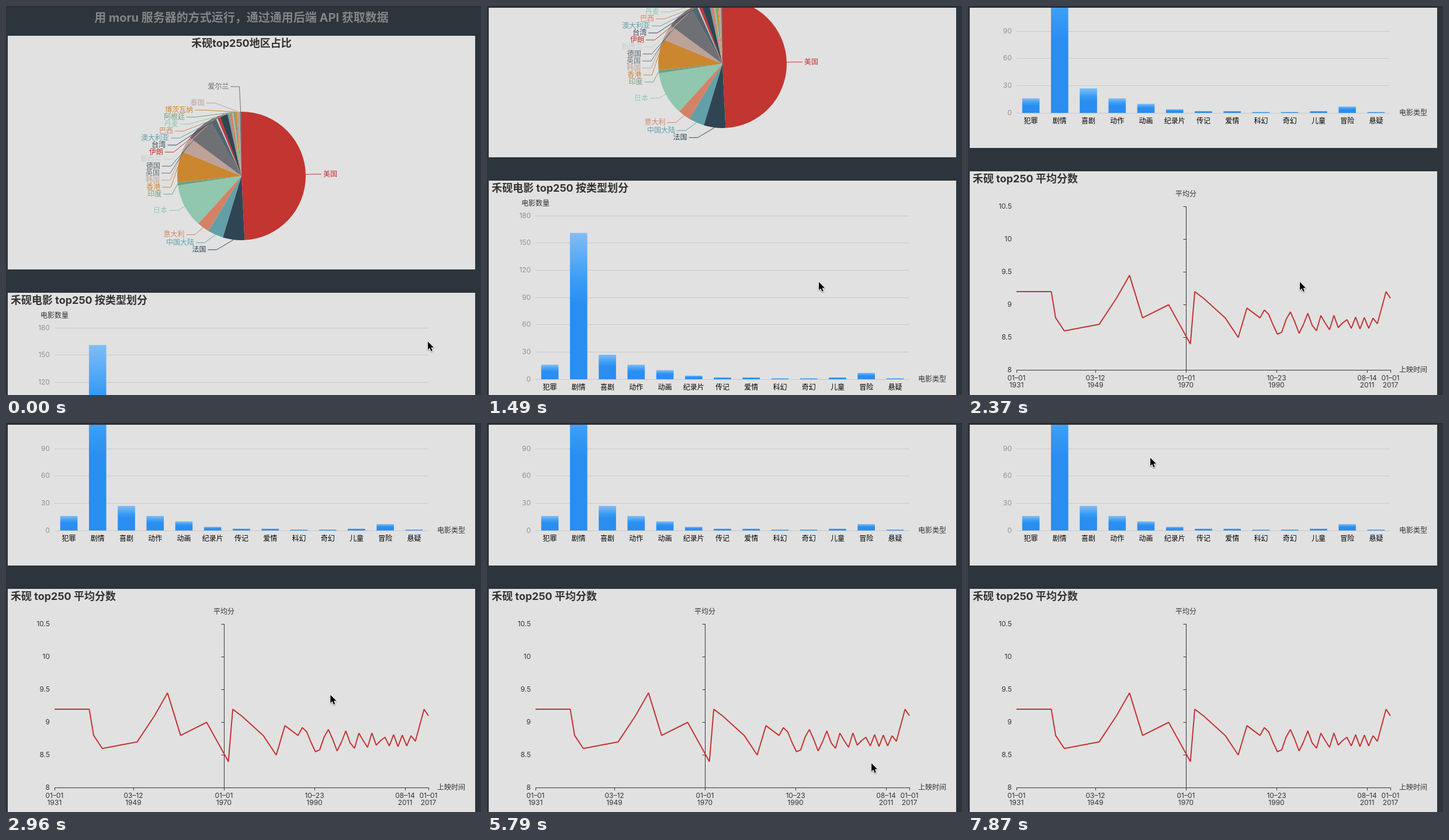
Animation of 813 by 666 pixels, one loop 8000 ms. Source, as an HTML page with a canvas:

```html
<!DOCTYPE html>
<html lang="zh-CN">
<head>
<meta charset="utf-8">
<title>Charts</title>
<style>
html, body { margin: 0; width: 100%; height: 100%; overflow: hidden; background: #2c343c; }
canvas { display: block; }
</style>
</head>
<body>
<canvas id="stage" width="813" height="666"></canvas>
<script>
const ctx = document.getElementById('stage').getContext('2d');
const FONT = 'Inter, "Noto Sans CJK SC", "Noto Sans CJK", sans-serif';
const TITLE = 'bold 18px';
const LOOP = 8000, STEP = 148.4, LAST_STEP = 53;
const LEFT = 83, WIDTH = 640, RIGHT = LEFT + WIDTH;
const PALETTE = ['#c23531', '#2f4554', '#61a0a8', '#d48265', '#91c7ae', '#749f83',
  '#ca8730', '#bda29a', '#6e7074', '#546570', '#c4ccd3'];

const regions = Object.entries({
  美国: 126, 法国: 14, 中国大陆: 10, 意大利: 8, 日本: 28, 印度: 2, 香港: 20, 韩国: 10,
  英国: 17, 德国: 4, 新西兰: 1, 伊朗: 2, 台湾: 5, 澳大利亚: 1, 巴西: 2, 丹麦: 1,
  阿根廷: 1, 博茨瓦纳: 1, 泰国: 2, 爱尔兰: 1
});
const genres = Object.entries({
  犯罪: 16, 剧情: 161, 喜剧: 27, 动作: 16, 动画: 10, 纪录片: 4, 传记: 2,
  爱情: 2, 科幻: 1, 奇幻: 1, 儿童: 2, 冒险: 7, 悬疑: 1
});
const dates = ['01–01 1931', '03–12 1949', '01–01 1970', '10–23 1990', '08–14 2011', '01–01 2017'];

// [years since 1931, score]; the busy later years follow a fading chirp
const recent = Array.from({ length: 26 }, (_, u) =>
  [57 + u, 8.72 + (.2 - .005 * u) * Math.cos(2 * Math.PI * u * (.12 + .008 * u))]);
const scores = [[0, 9.2], [8, 9.2], [9, 8.8], [11, 8.6], [19, 8.7], [23, 9.1], [26, 9.45],
  [29, 8.8], [35, 9], [40, 8.4], [41, 9.2], [43, 9.1], [48, 8.8], [51, 8.5], [53, 8.95],
  [56, 8.8], ...recent, [83, 8.71], [85, 9.2], [86, 9.1]];

// motion keys: [step, values...]
const scrollKeys = [[6.77, 0], [12, 311], [16, 648], [18, 648], [19, 647]];
const cursorBefore = [[0, 721, 573], [2, 731, 588], [3, 731, 588], [7, 567, 471],
  [18, 567, 471], [24, 529, 450]];
const cursorAfter = [[39, 657, 581], [46, 298, 450], [49, 277, 400], [53, 311, 58]];

function sample(keys, step) {
  const next = keys.findIndex(k => k[0] > step);
  if (next === 0) return keys[0].slice(1);
  if (next < 0) return keys[keys.length - 1].slice(1);
  const a = keys[next - 1], b = keys[next];
  const u = (step - a[0]) / (b[0] - a[0]);
  return a.slice(1).map((v, i) => v + (b[i + 1] - v) * u);
}

function text(str, x, y, align = 'left', color = '#333', font = '12px') {
  ctx.font = `${font} ${FONT}`;
  ctx.textAlign = align;
  ctx.fillStyle = color;
  ctx.fillText(str, x, y);
}

function line(points, color = '#333', width = 1) {
  ctx.beginPath();
  points.forEach(([x, y]) => ctx.lineTo(x, y));
  ctx.strokeStyle = color;
  ctx.lineWidth = width;
  ctx.stroke();
}

function rect(x, y, w, h, fill) {
  ctx.fillStyle = fill;
  ctx.fillRect(x, y, w, h);
}

const pie = { x: 403, y: 291, r: 110, labelR: 125, outerR: 140, top: 138, gap: 12 };

// labels keep a minimum gap downwards, then sit on a circle around the pie
function layoutPie() {
  const total = regions.reduce((sum, d) => sum + d[1], 0);
  let sum = 0;
  const slices = regions.map(([name, count], i) => {
    const start = sum / total * Math.PI * 2 - Math.PI / 2;
    sum += count;
    const end = sum / total * Math.PI * 2 - Math.PI / 2;
    const mid = (start + end) / 2;
    return { name, start, end, mid, side: i ? -1 : 1,
      color: PALETTE[i % PALETTE.length], y: pie.y + pie.labelR * Math.sin(mid) };
  });
  let minY = pie.top;
  slices.slice(1).reverse().forEach((s, i) => {
    s.y = i ? Math.max(minY, s.y) : minY;
    minY = s.y + pie.gap;
  });
  slices.forEach(s => {
    const dy = Math.abs(s.y - pie.y);
    const dx = dy < pie.labelR + 2 ? Math.sqrt(pie.outerR ** 2 - dy ** 2)
      : Math.abs(pie.labelR * Math.cos(s.mid)) + 20;
    s.x = pie.x + s.side * dx;
  });
  return slices;
}
const slices = layoutPie();

function drawPie() {
  text('禾砚top250地区占比', pie.x, 65, 'center', '#333', TITLE);
  for (const { name, start, end, mid, side, color, x, y } of slices) {
    ctx.beginPath();
    ctx.moveTo(pie.x, pie.y);
    ctx.arc(pie.x, pie.y, pie.r, start, end);
    ctx.fillStyle = color;
    ctx.fill();
    line([[x - 3 * side, y], [x - 18 * side, y],
      [pie.x + pie.r * Math.cos(mid), pie.y + pie.r * Math.sin(mid)]], color);
    text(name, x, y, side < 0 ? 'right' : 'left', color);
  }
}

function drawBars() {
  const base = 831, unit = 280 / 180, slot = WIDTH / genres.length;
  text('禾砚电影 top250 按类型划分', 8, 505, 'left', '#333', TITLE);
  text('电影数量', LEFT, 530, 'center');
  text('电影类型', 738, base);
  for (let v = 0; v <= 180; v += 30) {
    const y = Math.floor(base - v * unit);
    line([[LEFT, y + .5], [RIGHT, y + .5]], '#c9c9c9');
    text(v, 75, y, 'right', '#929292');
  }
  genres.forEach(([name, v], i) => {
    const x = LEFT + i * slot, h = v * unit;
    const fill = ctx.createLinearGradient(0, base - h, 0, base);
    fill.addColorStop(0, '#80bdf6');
    fill.addColorStop(.32, '#3a9cf4');
    fill.addColorStop(.5, '#2a8df0');
    rect(x + 9.8, base - h, 29.6, h, fill);
    text(name, x + slot / 2, 845, 'center', '#000');
  });
}

function drawScores() {
  const base = 1271, axisX = 373.5;
  const yearX = years => LEFT + years * WIDTH / 86;
  text('禾砚 top250 平均分数', 8, 945, 'left', '#333', TITLE);
  text('平均分', 373, 970, 'center');
  text('上映时间', 738, base);
  line([[axisX, 991], [axisX, base]]);
  line([[LEFT, base + .5], [RIGHT, base + .5]]);
  for (let i = 0; i <= 5; i++) {
    const y = base - i * 56;
    line([[axisX - 5, y + .5], [axisX, y + .5]]);
    text(8 + i / 2, 75, y, 'right');
  }
  dates.forEach(date => {
    const [day, year] = date.split(' ');
    const [m, d] = day.split('–');
    const x = Math.round(yearX(year - 1931 + (m - 1) / 12 + (d - 1) / 365));
    line([[x + .5, base], [x + .5, base + 5]]);
    text(day, x, 1285, 'center');
    text(year, x, 1297, 'center');
  });
  line(scores.map(([years, s]) => [yearX(years), base + .5 - (s - 8) * 112]), '#c23531', 2);
}

function drawCursor(x, y) {
  ctx.save();
  ctx.translate(x + 1, y + 1.5);
  ctx.beginPath();
  [[0, 0], [0, 14], [3.2, 11], [5.6, 16.5], [7.9, 15.5], [5.6, 10.2], [10, 10]]
    .forEach(p => ctx.lineTo(...p));
  ctx.closePath();
  ctx.shadowColor = 'rgba(0,0,0,.4)';
  ctx.shadowBlur = 2;
  ctx.shadowOffsetY = 1;
  ctx.strokeStyle = '#fff';
  ctx.lineWidth = 2;
  ctx.stroke();
  ctx.shadowColor = 'transparent';
  ctx.fillStyle = '#000';
  ctx.fill();
  ctx.restore();
}

function draw(now) {
  const step = Math.min(LAST_STEP, Math.floor((now % LOOP + 12) / STEP));
  const scroll = Math.round(sample(scrollKeys, step)[0]);
  rect(0, 0, 813, 666, '#2c343c');
  ctx.textBaseline = 'middle';
  ctx.lineJoin = 'bevel';
  ctx.save();
  ctx.translate(0, -scroll);
  text('用 moru 服务器的方式运行，通过通用后端 API 获取数据', 403, 21, 'center', '#858585', 'bold 20px');
  [51, 491, 931].forEach(y => rect(3, y, 800, 400, '#e1e1e1'));
  drawPie();
  drawBars();
  drawScores();
  ctx.restore();
  rect(0, 0, 813, 3, '#2e2f33');
  if (step < 25) drawCursor(...sample(cursorBefore, step));
  else if (step >= 39) drawCursor(...sample(cursorAfter, step));
  requestAnimationFrame(draw);
}
requestAnimationFrame(draw);
</script>
</body>
</html>
```
